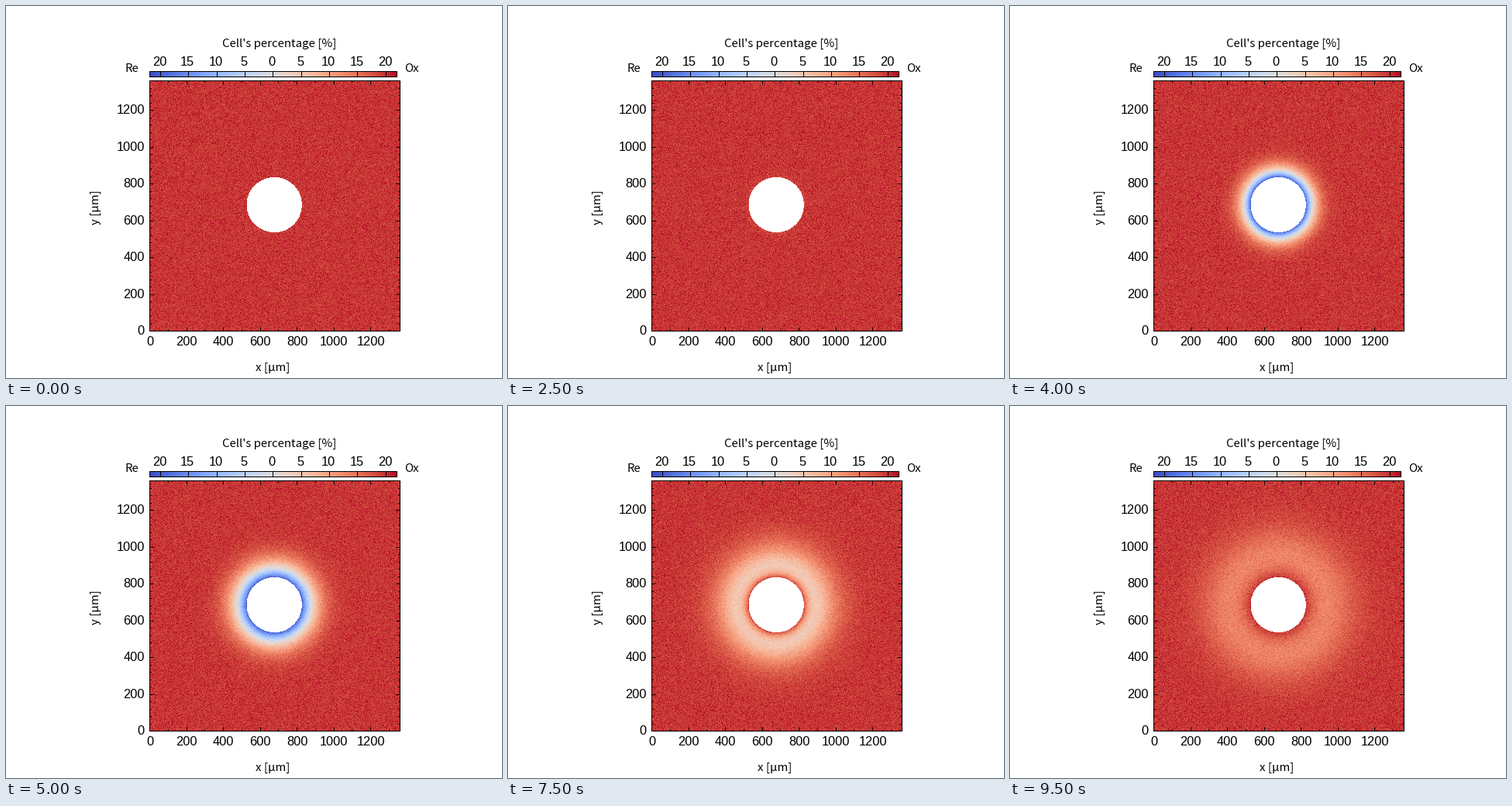
A matplotlib script for the animation above (10000 ms loop, 640 px wide and 480 px high).

```python
import numpy as np
import matplotlib.pyplot as plt
from matplotlib.animation import FuncAnimation

FRAMES, INTERVAL = 20, 500
LEFT, RIGHT, TOP, BOTTOM = 185.5, 508.5, 96.5, 419.5   # plot frame, pixels
SCALE = 323 / 1360                                     # pixels per micrometre
LIMIT, BULK, NOISE = 22, 19.6, 1.25

plt.rcParams["font.family"] = "Noto Sans CJK JP"
fig = plt.figure(figsize=(6.4, 4.8), dpi=100, facecolor="white")
ax = fig.add_axes([0, 0, 1, 1])


def line(x0, y0, x1, y1):
    ax.plot([x0, x1], [y0, y1], color="black", lw=0.72, zorder=3,
            solid_capstyle="butt", snap=False)


def box(x0, y0, x1, y1):
    ax.add_patch(plt.Rectangle((x0, y0), x1 - x0, y1 - y0, fill=False,
                               ec="black", lw=0.72, zorder=4, snap=False))


def label(x, y, text, size=10.8, ha="center", **kw):
    ax.text(x, y, text, fontsize=size, ha=ha, va="baseline", **kw)


def number(x, y, value, ha="center"):
    label(x, y, str(value), 11.8, ha, family="Liberation Sans")


def radial_profiles():
    """Diffusion around a disc electrode during a triangular potential sweep."""
    diffusivity, step, substeps = 2300.0, 4.0, 200
    dt = INTERVAL / 1000 / substeps
    r = np.arange(150, 1000, step)
    reduced = np.zeros_like(r)
    mid = r[1:-1]
    rows = [reduced.copy()]
    for n in range(1, (FRAMES - 1) * substeps + 1):
        t = n * dt
        overpotential = 6 * (1.9 - abs(t - 5))
        left, centre, right = reduced[:-2], reduced[1:-1], reduced[2:]
        flow = ((left - 2 * centre + right) / step**2
                + (right - left) / (2 * step * mid))
        reduced[1:-1] = centre + diffusivity * dt * flow
        reduced[0] = 1 / (1 + np.exp(-overpotential))
        reduced[-1] = reduced[-2]
        if n % substeps == 0:
            rows.append(reduced.copy())
    return r, BULK * (1 - 2 * np.array(rows))


radii, profiles = radial_profiles()
px, py = np.meshgrid(np.arange(186, 508) + 0.5, np.arange(97, 419) + 0.5)
distance = np.hypot(px - 346.2, py - 256.5) / SCALE
electrode = distance < 150


def cell_values(frame):
    rng = np.random.default_rng(100 + frame)
    mean = np.interp(distance, radii, profiles[frame])
    values = mean + rng.normal(0, NOISE, distance.shape)
    return np.ma.masked_where(electrode, values)


style = dict(cmap="coolwarm", aspect="auto", interpolation="nearest")
cells = ax.imshow(cell_values(0), vmin=-LIMIT, vmax=LIMIT,
                  extent=[186, 508, 419, 97], **style)
ax.imshow(np.linspace(0, 1, 320)[None, :], extent=[185, 505, 92, 84], **style)

box(LEFT, TOP, RIGHT, BOTTOM)
box(185.5, 84.5, 504.5, 91.5)

# Inward ticks on all four sides, longer at each 200 micrometres.
for value in range(0, 1360, 100):
    x = np.floor(LEFT + value * SCALE) + 0.5
    size = 2.5 if value % 200 else 5
    line(x, BOTTOM, x, BOTTOM - size)
    line(x, TOP, x, TOP + size)
for value in range(0, 1360, 40):
    y = np.floor(BOTTOM - value * SCALE) + 0.5
    size = 2.5 if value % 200 else 5
    line(LEFT, y, LEFT + size, y)
    line(RIGHT, y, RIGHT - size, y)
for value in range(0, 1201, 200):
    number(LEFT + value * SCALE, 438.5, value)
    number(179, BOTTOM - value * SCALE + 4.7, value, "right")

for value in range(-20, 21, 5):
    x = 344.8 + value * 320 / (2 * LIMIT)
    tick = np.floor(x) + 0.5
    line(tick, 84.5, tick, 91.5)
    number(x - 1.4, 77, abs(value))

label(353, 53, "Cell's percentage [%]")
label(162, 85, "Re")
label(523.5, 85, "Ox")
label(344.5, 471, "x [\u00b5m]")
label(119.5, 259.5, "y [\u00b5m]", rotation=90, rotation_mode="anchor")

ax.set_xlim(0, 640)
ax.set_ylim(480, 0)
ax.axis("off")


def update(frame):
    cells.set_data(cell_values(frame))
    return [cells]


anim = FuncAnimation(fig, update, frames=FRAMES, interval=INTERVAL,
                     repeat=True, repeat_delay=0)
plt.show()
```
